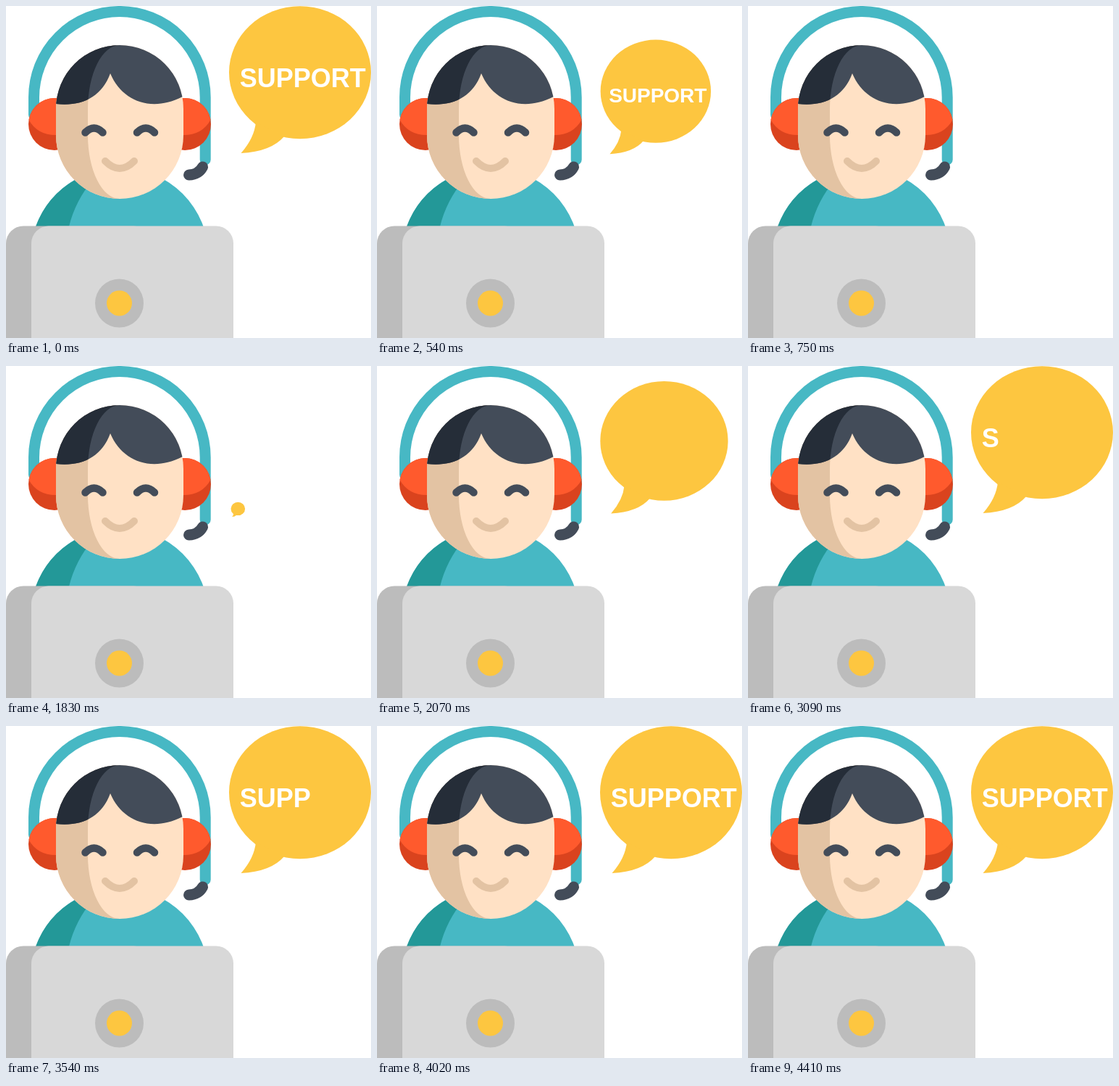
Write an HTML page that moves like this. It is 504x458 px and loops after 4440 ms.

```html
<!DOCTYPE html>
<html lang="en">
<head>
<meta charset="utf-8">
<title>Support agent</title>
<style>
  html, body { margin: 0; width: 100%; height: 100%; overflow: hidden; background: #fff; }
  svg { display: block; width: 504px; height: 458px; }
  text { font: bold 36px "Liberation Sans", Arial, sans-serif; fill: #fff; }
  .line { fill: none; stroke-linecap: round; }
</style>
</head>
<body>
<svg viewBox="0 0 504 458">
  <defs>
    <clipPath id="head"><rect x="69" y="54" width="176" height="212" rx="88"/></clipPath>
    <path id="shade" d="M157 54A44 88 0 0 0 113 142V178A44 88 0 0 0 157 266H60V54Z"/>
    <clipPath id="shaded"><use href="#shade"/></clipPath>
    <path id="hair" d="M60 50H250V122L243 125.500C200 147 160 131 144 93C132 126 104 139 69 135H60Z"/>
    <path id="eye" class="line" stroke="#434c59" stroke-width="10.500" d="M109.500 174.500Q121.500 162.500 133.500 174.500"/>
    <g id="ear">
      <circle cx="67" cy="163" r="36" fill="#da431e"/>
      <path fill="#ff5a2d" d="M75 127H67A36 36 0 0 0 31.500 157Q43 178 69 178H75Z"/>
    </g>
  </defs>

  <!-- body -->
  <circle cx="157" cy="346" r="123" fill="#47b8c4"/>
  <path fill="#239898" d="M41 304A123 123 0 0 1 95 240H120Q96 268 87 304Z"/>

  <!-- headset -->
  <path class="line" stroke="#47b8c4" stroke-width="15" d="M38.500 150V126A118.300 118.500 0 0 1 275.200 126V212"/>
  <path class="line" stroke="#434c59" stroke-width="15" d="M252.500 233Q266 232.500 271.500 222"/>
  <use href="#ear"/>
  <use href="#ear" transform="translate(314) scale(-1 1)"/>

  <!-- head -->
  <g clip-path="url(#head)">
    <path fill="#ffe1c5" d="M60 50H250V270H60Z"/>
    <use href="#shade" fill="#e3c3a3"/>
    <use href="#hair" fill="#434c59"/>
    <g clip-path="url(#shaded)"><use href="#hair" fill="#252d38"/></g>
  </g>
  <use href="#eye"/>
  <use href="#eye" x="71.500"/>
  <path class="line" stroke="#e3c3a3" stroke-width="10" d="M137 214Q157 234 177 214"/>

  <!-- laptop -->
  <rect y="303.500" width="200" height="200" rx="24" fill="#bcbcbc"/>
  <rect x="35" y="303.500" width="279" height="200" rx="24" fill="#d8d8d8"/>
  <circle cx="156.500" cy="410" r="33.500" fill="#bcbcbc"/>
  <circle cx="156.500" cy="410" r="17.500" fill="#fdc640"/>

  <g id="bubble">
    <g fill="#fdc640">
      <ellipse cx="406" cy="91.700" rx="98" ry="91.500"/>
      <path d="M345 160Q343 182 324.500 203Q366 201 384 180Z"/>
    </g>
    <g id="dots" fill="#fff">
      <rect x="378.500" y="103" width="9.500" height="9.500"/>
      <rect x="405.500" y="103" width="9.500" height="9.500"/>
      <rect x="432.500" y="103" width="9.500" height="9.500"/>
    </g>
    <text id="word" x="322.800" y="112"></text>
  </g>
</svg>
<script>
  const LOOP = 4440, STEP = 30, WORD = "SUPPORT";
  const HIDE = 480, SHOW = 1800, DOTS = 2340, TYPE = 3060;
  const bubble = document.getElementById("bubble");
  const word = document.getElementById("word");
  const dots = [...document.getElementById("dots").children];

  const clamp = v => Math.max(0, Math.min(1, v));

  function draw(now) {
    const time = now % LOOP;
    const tick = Math.floor(time / STEP) * STEP;

    const scale = time < SHOW ? 1 - clamp((tick - HIDE) / 270) : clamp((tick - SHOW) / 300);
    bubble.setAttribute("transform", `translate(310.8 208.6) scale(${scale}) translate(-310.8 -208.6)`);
    bubble.setAttribute("visibility", scale > 0 ? "visible" : "hidden");

    const dotCount = time < DOTS || time >= TYPE ? 0 : Math.floor((time - DOTS) / 240) + 1;
    dots.forEach((dot, i) => dot.setAttribute("opacity", i < dotCount ? 1 : 0));

    const letters = time < SHOW ? WORD.length : Math.max(0, Math.floor((time - TYPE) / 160) + 1);
    word.textContent = WORD.slice(0, letters);
  }

  const start = performance.now();
  function frame() {
    draw(performance.now() - start);
    requestAnimationFrame(frame);
  }
  frame();
</script>
</body>
</html>
```
